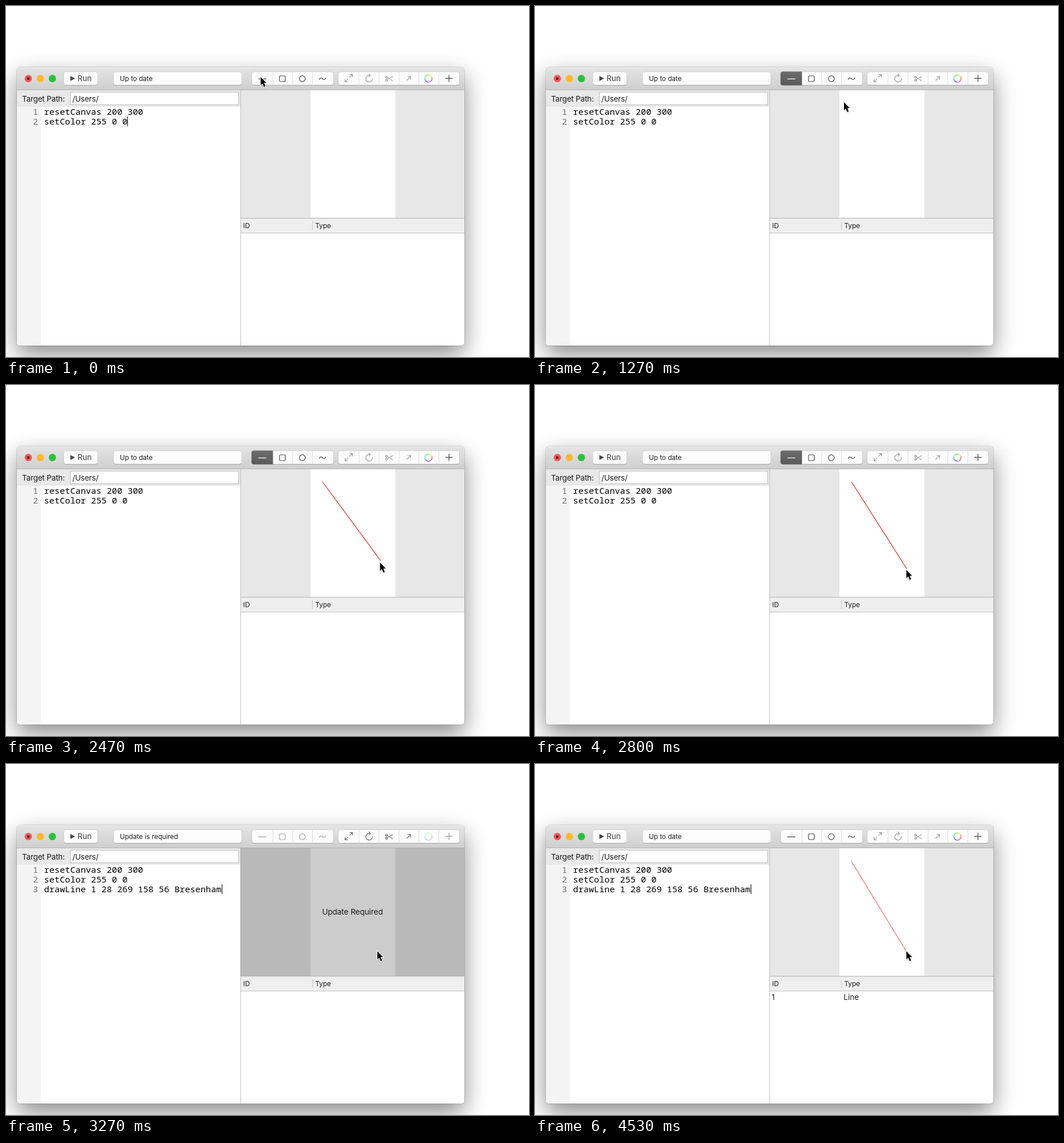
These frames come from a looping animation (914 by 613 pixels, 4.59 s). An HTML page:

```html
<!DOCTYPE html>
<html lang="en">
<head>
<meta charset="utf-8">
<title>Line drawing</title>
<style>
html, body { margin: 0; width: 100%; height: 100%; overflow: hidden; background: #fff; }
svg { display: block; }
text { font-family: Inter, "Open Sans", sans-serif; font-size: 13.6px; fill: #1c1c1c; white-space: pre; }
.small { font-size: 11.7px; }
.tight { letter-spacing: -.25px; }
.code { font-family: "Noto Sans Mono", "Liberation Mono", monospace; font-size: 15.2px; fill: #000; }
.num { fill: #757575; }
.icon { fill: none; stroke: #444; stroke-width: 1.2; stroke-linecap: round; stroke-linejoin: round; }
.edit { stroke: #9b9b9b; }
.off .icon { stroke: #a2a2a2; }
.off .edit { stroke: #666; }
.off #ring { opacity: .4; }
</style>
</head>
<body>
<svg id="stage" width="914" height="613" viewBox="0 0 914 613"></svg>
<script>
const LOOP = 4590, FPS = 15;
const stage = document.getElementById('stage');

const rect = (x, y, w, h, fill, more = '') =>
  `<rect x="${x}" y="${y}" width="${w}" height="${h}" fill="${fill}" ${more}/>`;
const label = (x, y, str, cls = '', more = '') =>
  `<text x="${x}" y="${y}" class="${cls}" ${more}>${str}</text>`;
const icon = (d, cls = '') => `<path class="icon ${cls}" d="${d}"/>`;
const dot = (x, r, fill) => `<circle cx="${x}" cy="126.7" r="${r}" fill="${fill}"/>`;
const button = (x, w) =>
  rect(x, 115.5, w, 23.5, '#000', 'rx="4" opacity=".17"') +
  rect(x, 115, w, 23, '#fcfcfc', 'rx="4" stroke="#000" stroke-opacity=".12" stroke-width=".8"');
const dividers = xs => xs.map(x => rect(x, 115, 1, 23.5, '#dcdcdc')).join('');
const codeLine = (n, str) =>
  label(47, 173 + 17 * n, n, 'code num') + label(66.6, 173 + 17 * n, str, 'code');

function colorRing(cx, cy, r, parts = 24) {
  let out = '';
  for (let i = 0; i < parts; i++) {
    const at = k => {
      const a = k / parts * 2 * Math.PI;
      return `${cx + r * Math.cos(a)} ${cy + r * Math.sin(a)}`;
    };
    out += `<path d="M${at(i)}A${r} ${r} 0 0 1 ${at(i + 1.1)}" fill="none" stroke-width="1.7" stroke="hsl(${-i * 360 / parts},85%,68%)"/>`;
  }
  return `<g id="ring">${out}</g>`;
}

// Pixel line on the 200 x 300 canvas, shown at 0.74 scale with y pointing up
function pixelLine(x0, y0, x1, y1) {
  const s = .74, n = y0 - y1;
  let d = '';
  for (let i = 0; i <= n; i++) {
    const x = x0 + Math.round(i * (x1 - x0) / n);
    d += `M${(532 + x * s).toFixed(2)} ${(147 + (300 - y0 + i) * s).toFixed(2)}h.9v.8h-.9z`;
  }
  return `<path id="pixels" d="${d}" fill="#dc2a1c"/>`;
}

stage.innerHTML = `
<defs>
  <linearGradient id="bar" x2="0" y2="1"><stop stop-color="#e4e4e4"/><stop offset="1" stop-color="#cfcfcf"/></linearGradient>
  <linearGradient id="down" x2="0" y2="1"><stop stop-color="#6c6c6c"/><stop offset="1" stop-color="#5a5a5a"/></linearGradient>
  <filter id="blur" filterUnits="userSpaceOnUse" x="-100" y="0" width="1014" height="720"><feGaussianBlur stdDeviation="20"/></filter>
  <filter id="soft" x="-50%" y="-50%" width="200%" height="200%"><feGaussianBlur stdDeviation="1.2"/></filter>
  <clipPath id="frame">${rect(19, 107, 782, 486, '#000', 'rx="5"')}</clipPath>
  <path id="arrow" d="M0 0V14.2L3.2 11.2 5.7 17.2 8.3 16.1 5.8 10.2H10.1Z"/>
</defs>
${rect(19, 123, 782, 486, '#000', 'rx="5" opacity=".45" filter="url(#blur)"')}
${rect(18.5, 106.5, 783, 487, '#000', 'rx="5.5" opacity=".25"')}
<g clip-path="url(#frame)">
  ${rect(19, 107, 782, 486, '#fff')}
  ${rect(19, 107, 782, 39, 'url(#bar)')}
  ${rect(19, 107, 782, 1, '#f1f1f1')}
  ${rect(19, 146, 782, 1, '#b3b3b3')}
  ${rect(19, 147, 391, 29, '#e9e9e9')}
  ${rect(19, 176, 42, 417, '#f4f4f4')}
  ${rect(112.5, 150.5, 294, 22, '#fff', 'stroke="#bdbdbd"')}
  ${rect(410, 147, 391, 223, '#e7e7e7')}
  ${rect(532, 147, 148.5, 223, '#fff')}
  ${rect(410, 370, 391, 1.5, '#b8b8b8')}
  ${rect(410, 371.5, 391, 24.5, '#efefef')}
  ${rect(410, 396, 391, 1, '#c2c2c2')}
  ${rect(535, 376, 1, 15, '#c6c6c6')}
  ${rect(409.5, 147, 1, 446, '#bcbcbc')}
</g>
${dot(39, 6.4, '#fc5652') + dot(39, 2.3, '#3a0503') + dot(60, 6.4, '#fdb92e') + dot(81, 6.4, '#28c23a')}
${button(101, 59.5)}
<path d="M112.5 122.2L120.7 126.6 112.5 131Z" fill="#444"/>
${label(125, 131.4, 'Run', '', 'style="fill:#3c3c3c"')}
${button(188, 224)}
${label(199, 131, '', 'small', 'id="status"')}
<g id="tools">
  ${button(429.5, 143)}
  ${dividers([466, 500.5, 535])}
  <path id="pressed" d="M466.5 114.6V138.6H433a4 4 0 0 1-4-4V118.6a4 4 0 0 1 4-4Z" fill="url(#down)"/>
  ${icon('M441.5 127.3H454.5')}
  <path id="dash" class="icon" d="M441.5 127.3H454.5" style="stroke:#fff"/>
  <rect class="icon" x="478" y="122" width="10" height="10" rx="1.5"/>
  <circle class="icon" cx="517.8" cy="127" r="5.1"/>
  ${icon('M547.5 128.3C549 124.6 551.5 125.4 553 127S557.2 129.2 558.6 125.7')}
  ${button(580.5, 212)}
  ${dividers([616.5, 651.5, 686.5, 721, 756])}
  ${icon('M600.7 124.4L605.3 119.8M601.2 119.7H605.4V123.9M597.3 127.8L592.7 132.4M592.6 128.3V132.5H596.8', 'edit')}
  ${icon('M640.4 126.6A5.8 5.8 0 1 1 634.4 121.2H636.8M634.4 118.6L637 121.2 634.4 123.8', 'edit')}
  ${icon('M675.4 123.6L666.4 129M675.4 130.4L666.4 125', 'edit')}
  <circle class="icon edit" cx="665" cy="124.3" r="1.6"/>
  <circle class="icon edit" cx="665" cy="129.7" r="1.6"/>
  ${icon('M700.3 129.8L706.8 123.3M702.2 123H707V127.8', 'edit')}
  ${colorRing(738.2, 126.7, 6.3)}
  ${icon('M768.3 126.4H780M774.1 120.6V132.2')}
</g>
${label(28, 166.8, 'Target Path:', 'tight')}
${label(116, 166.8, '/Users/', 'tight')}
${codeLine(1, 'resetCanvas 200 300')}
${codeLine(2, 'setColor 255 0 0')}
<g id="third">${codeLine(3, 'drawLine 1 28 269 158 56 Bresenham')}</g>
${rect(212, 193, 1, 17, '#000', 'id="caret"')}
${label(414.5, 387.6, 'ID', 'small')}
${label(540.5, 387.6, 'Type', 'small')}
<g id="row">${label(413.5, 411.6, '1')}${label(539.3, 411.6, 'Line')}</g>
<path id="drag" fill="none" stroke="#d0281a" stroke-width="1.2"/>
${pixelLine(28, 269, 158, 56)}
<g id="notice">
  ${rect(410, 147, 391, 223, '#000', 'opacity=".2"')}
  ${label(605.5, 263.3, 'Update Required', '', 'text-anchor="middle" letter-spacing="-.1"')}
</g>
<g id="cursor">
  <use href="#arrow" y="1.5" opacity=".35" filter="url(#soft)"/>
  <use href="#arrow" fill="#000" stroke="#fff" stroke-width="2" paint-order="stroke"/>
</g>`;

const el = {};
for (const node of stage.querySelectorAll('[id]')) el[node.id] = node;
const show = (node, on) => node.setAttribute('visibility', on ? 'visible' : 'hidden');

// Pointer path: tick, x, y
const path = [
  [0, 445, 124], [12, 445, 124], [13, 449, 126], [16, 499, 151], [19, 540, 168], [20, 541, 168],
  [21, 549, 168], [22, 553, 169], [24, 559, 182], [27, 559, 182], [28, 571, 198],
  [30, 635, 277], [31, 648, 295], [32, 652, 301], [35, 655, 306], [36, 655, 307],
  [39, 651, 317], [42, 649, 323], [44, 649, 324], [47, 649, 327], [69, 649, 327]
];
function pointer(k) {
  const i = Math.max(1, path.findIndex(p => p[0] >= k));
  const [a, x0, y0] = path[i - 1], [b, x1, y1] = path[i];
  const u = (k - a) / (b - a);
  return [x0 + (x1 - x0) * u, y0 + (y1 - y0) * u];
}

const blinks = [[0, 2], [11, 19], [28, 36], [44, 57], [66, 69]];
const PRESS = 7, DRAG = 23, SUBMIT = 49, DONE = 50;

function draw(ms) {
  const k = Math.floor((ms + 4) * FPS / 1000);
  const waiting = k >= SUBMIT && k < DONE;
  const selected = k >= PRESS && k < SUBMIT;
  const typed = k >= SUBMIT;

  el.cursor.setAttribute('transform', `translate(${pointer(k)})`);
  el.drag.setAttribute('d', `M553 169L${pointer(Math.max(DRAG - 1, k - 1))}`);
  show(el.drag, k >= DRAG && k < SUBMIT);
  show(el.pressed, selected);
  show(el.dash, selected);
  el.tools.setAttribute('class', waiting ? 'off' : '');
  el.status.textContent = waiting ? 'Update is required' : 'Up to date';
  show(el.notice, waiting);
  show(el.third, typed);
  show(el.pixels, k >= DONE);
  show(el.row, k >= DONE);
  el.caret.setAttribute('x', typed ? 377 : 212);
  el.caret.setAttribute('y', typed ? 210 : 193);
  show(el.caret, blinks.some(([a, b]) => k >= a && k < b));
}

const start = performance.now();
function tick() {
  draw((performance.now() - start) % LOOP);
  requestAnimationFrame(tick);
}
tick();
</script>
</body>
</html>
```
